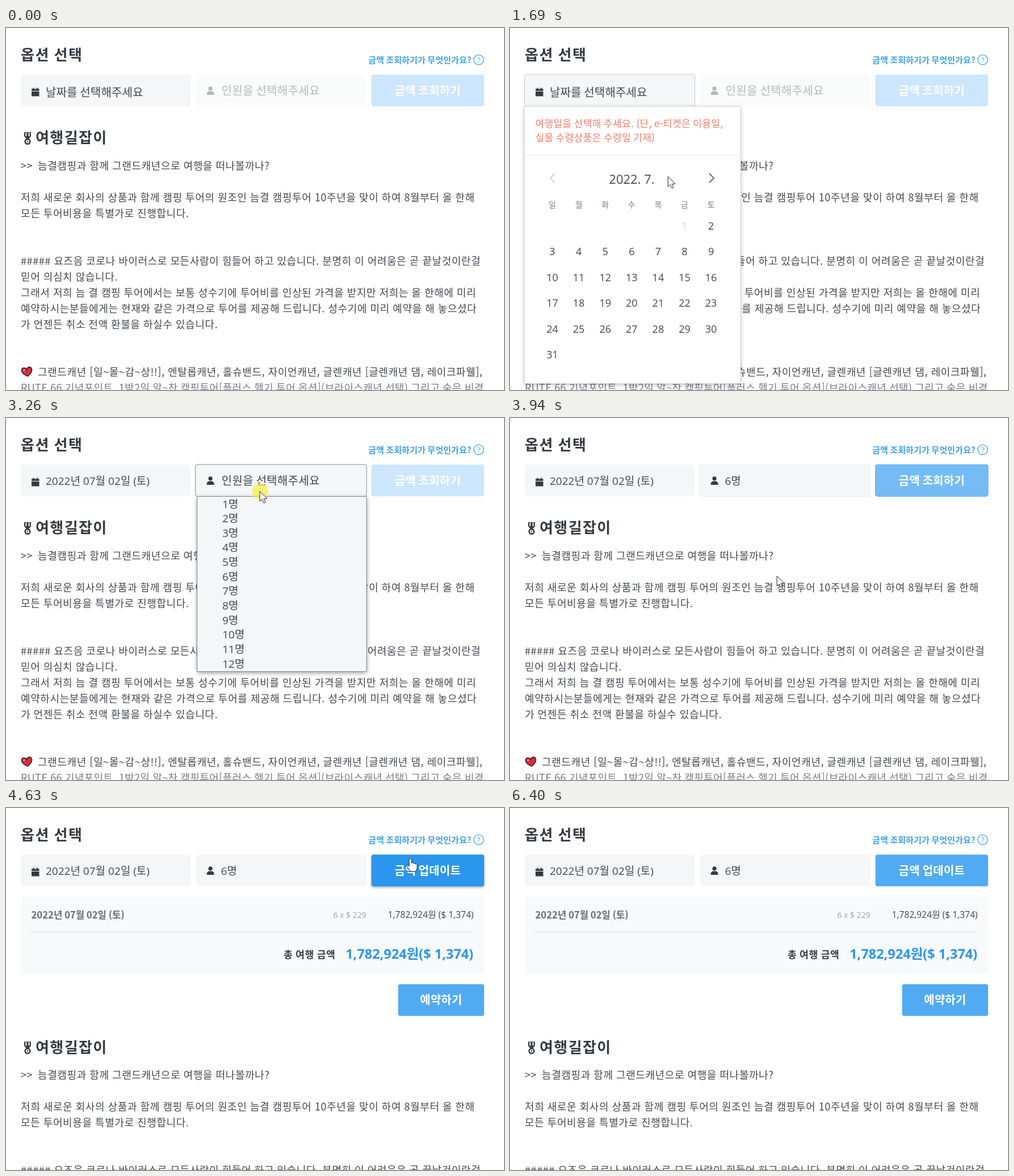
An HTML page with a canvas for the animation above (6.94 s loop, 877 px wide and 639 px high).

```html
<!DOCTYPE html>
<html lang="ko">
<head>
<meta charset="utf-8">
<title>옵션 선택</title>
<style>
html, body { margin: 0; width: 100%; height: 100%; overflow: hidden; background: #fff; }
canvas { display: block; width: 877px; height: 639px; }
</style>
</head>
<body>
<canvas id="stage"></canvas>
<script>
const W = 877, H = 639, LOOP = 6940;
const canvas = document.getElementById('stage');
const ctx = canvas.getContext('2d');
const dpr = window.devicePixelRatio || 1;
canvas.width = W * dpr;
canvas.height = H * dpr;

const KR = '"Noto Sans CJK KR", "Noto Sans CJK", sans-serif';
const MIX = '"Open Sans", ' + KR;
const INK = '#343a40', SOFT = '#42484e', FIELD = '#f4f6f8', BLUE = '#51abf3', DEEP = '#2b96ed';

const OPEN_CAL = 1280, PICK_DATE = 2240, OPEN_LIST = 3190, PICK_COUNT = 3870, SHOW_PRICE = 4560;

// time, x, y, 1 = linear arrival
const path = [
  [320, 717, 491], [950, 207.5, 117], [1280, 207.5, 117], [1410, 216, 150, 1],
  [1690, 278, 262, 1], [1900, 334, 344, 1], [1970, 341, 351, 1], [2640, 341, 351],
  [3190, 447, 129.5], [3330, 447, 129.5], [3460, 455, 158], [3600, 470, 279],
  [4010, 470, 279], [4490, 712, 89], [5100, 712, 89], [5720, 774, 340],
  [6120, 774, 340], [6400, 838, 642]
];
const clicks = [[1080, 1280], [2040, 2240], [3190, 3460], [3800, 3870]];

const body = [
  [56, 243, '늠결캠핑과 함께 그랜드캐년으로 여행을 떠나볼까나?'],
  [26, 299, '저희 새로운 회사의 상품과 함께 캠핑 투어의 원조인 늠결 캠핑투어 10주년을 맞이 하여 8월부터 올 한해'],
  [26, 327, '모든 투어비용을 특별가로 진행합니다.'],
  [26, 411, '##### 요즈음 코로나 바이러스로 모든사람이 힘들어 하고 있습니다. 분명히 이 어려움은 곧 끝날것이란걸'],
  [26, 439, '믿어 의심치 않습니다.'],
  [26, 467, '그래서 저희 늠 결 캠핑 투어에서는 보통 성수기에 투어비를 인상된 가격을 받지만 저희는 올 한해에 미리'],
  [26, 495, '예약하시는분들에게는 현재와 같은 가격으로 투어를 제공해 드립니다. 성수기에 미리 예약을 해 놓으셨다'],
  [26, 523, '가 언젠든 취소 전액 환불을 하실수 있습니다.'],
  [56, 607, '그랜드캐년 [일~몰~감~상!!], 엔탈롭캐년, 홀슈밴드, 자이언캐년, 글렌캐년 [글렌캐년 댐, 레이크파웰],']
];

const between = (t, a, b) => t >= a && t < b;
const clamp = v => Math.max(0, Math.min(1, v));
const smooth = u => u * u * (3 - 2 * u);

// y is the optical middle of the line
function text(s, x, y, size, o = {}) {
  ctx.font = `${o.weight || 400} ${size}px ${o.font || KR}`;
  ctx.letterSpacing = (o.gap || 0) + 'px';
  ctx.wordSpacing = (o.word || 0) + 'px';
  ctx.textAlign = o.align || 'left';
  ctx.fillStyle = o.color || SOFT;
  ctx.fillText(s, x, y + size * 0.37);
}

function box(x, y, w, h, r, fill, stroke) {
  ctx.beginPath();
  ctx.roundRect(x, y, w, h, r);
  if (fill) { ctx.fillStyle = fill; ctx.fill(); }
  ctx.shadowColor = 'transparent';
  if (stroke) { ctx.strokeStyle = stroke; ctx.lineWidth = 1; ctx.stroke(); }
}

function shadow(color, blur, dy) {
  ctx.shadowColor = color;
  ctx.shadowBlur = blur * dpr;
  ctx.shadowOffsetY = dy * dpr;
}

function line(points, color, width) {
  ctx.beginPath();
  points.forEach(p => ctx.lineTo(...p));
  ctx.strokeStyle = color;
  ctx.lineWidth = width;
  ctx.stroke();
}

function dot(x, y, r, fill) {
  ctx.beginPath();
  ctx.arc(x, y, r, 0, 7);
  ctx.fillStyle = fill;
  ctx.fill();
}

function mix(a, b, u) {
  return `rgb(${a.map((v, i) => Math.round(v + (b[i] - v) * u))})`;
}

function cursorAt(t) {
  if (t < path[0][0] || t >= path[path.length - 1][0]) return null;
  const i = path.findIndex(k => k[0] > t);
  const a = path[i - 1], b = path[i];
  let u = (t - a[0]) / (b[0] - a[0]);
  if (!b[3]) u = smooth(u);
  return { x: a[1] + (b[1] - a[1]) * u, y: a[2] + (b[2] - a[2]) * u };
}

const inside = (p, x, y, w, h) => p && p.x >= x && p.x <= x + w && p.y >= y && p.y <= y + h;

function button(label, x, y, w, h, fill, hover, stroke) {
  if (hover) shadow('rgba(0,0,0,.35)', 4, 2);
  box(x, y, w, h, 4, fill, stroke);
  text(label, x + w / 2, y + h / 2, 20, { weight: 700, color: '#fff', align: 'center', gap: 0.2 });
}

function header() {
  text('옵션 선택', 26, 47, 26, { weight: 700, gap: 1.6, color: INK });
  text('금액 조회하기가 무엇인가요?', 638, 56, 15, { weight: 700, color: '#3ba1ef', gap: 0.1 });
  ctx.beginPath();
  ctx.arc(832.5, 56, 8.7, 0, 7);
  ctx.strokeStyle = '#3ba1ef';
  ctx.lineWidth = 1.3;
  ctx.stroke();
  text('?', 832.5, 56, 13, { font: MIX, color: '#3ba1ef', align: 'center' });
}

function dateField(t) {
  const focus = between(t, 880, 1970);
  if (focus) box(25.5, 82, 300, 56.5, 4, FIELD, '#c6cacf');
  else box(26, 82.5, 299, 55.5, 4, FIELD);
  ctx.fillStyle = INK;
  ctx.fillRect(47.5, 105.5, 2, 4);
  ctx.fillRect(54, 105.5, 2, 4);
  ctx.fillRect(45, 107.5, 13.5, 3.5);
  ctx.fillRect(45, 112, 13.5, 8.5);
  if (t < PICK_DATE) text('날짜를 선택해주세요', 70, 113.5, 20, { gap: 0.15 });
  else text('2022년 07월 02일 (토)', 70, 111, 19, { font: MIX });
}

function countField(t) {
  const on = t >= PICK_DATE;
  const color = on ? INK : '#b4b8bc';
  if (between(t, OPEN_LIST, PICK_COUNT)) box(333.5, 82, 301.5, 56.5, 4, FIELD, '#85898d');
  else if (between(t, PICK_COUNT, 4010)) box(333.5, 82, 301.5, 56.5, 4, FIELD, '#e9edf0');
  else box(334.5, 82.5, 300, 55.5, 4, on ? FIELD : '#fafbfb');
  dot(360, 106.8, 3.6, color);
  box(353.5, 111.5, 13, 6.5, [5, 5, 1, 1], color);
  if (t < PICK_COUNT) text('인원을 선택해주세요', 379.5, 111, 20, { color: on ? SOFT : color, gap: 0.3 });
  else text('6명', 378.5, 111, 19, { font: MIX });
}

function priceButton(t, p) {
  const u = clamp((t - 3862) / 112);
  const hover = t > 4100 && inside(p, 644, 82.5, 198, 55.5);
  const fill = hover ? DEEP : mix([204, 230, 253], [81, 171, 243], u);
  const edge = u > 0 && u < 1 ? BLUE : null;
  button(t < SHOW_PRICE ? '금액 조회하기' : '금액 업데이트', 643.5, 82.3, 198.5, 56, fill, hover, edge);
}

function medal(x, y) {
  ctx.fillStyle = INK;
  ctx.beginPath();
  [[-6, -10], [6, -10], [6, -3], [2, 2], [-2, 2], [-6, -3]].forEach(q => ctx.lineTo(x + q[0], y + q[1]));
  ctx.fill();
  ctx.fillStyle = '#fff';
  ctx.fillRect(x - 3.6, y - 9, 2, 6);
  ctx.fillRect(x + 1.6, y - 9, 2, 6);
  dot(x, y + 6.5, 5.6, INK);
  dot(x, y + 6.5, 3, '#fff');
  dot(x, y + 6.5, 1.2, INK);
}

function heart(x, y) {
  ctx.save();
  ctx.translate(x, y);
  ctx.rotate(-0.15);
  ctx.beginPath();
  ctx.moveTo(0, 8);
  ctx.bezierCurveTo(-6, 4, -10, 0, -9, -4);
  ctx.bezierCurveTo(-8, -9, -2, -9, 0, -4);
  ctx.bezierCurveTo(2, -9, 8, -9, 9, -4);
  ctx.bezierCurveTo(10, 0, 6, 4, 0, 8);
  ctx.fillStyle = '#d92f3c';
  ctx.fill();
  ctx.strokeStyle = '#3a1218';
  ctx.lineWidth = 1.5;
  ctx.stroke();
  ctx.restore();
  dot(x - 5, y - 3, 1.5, '#f7a5ab');
}

function article(shift) {
  ctx.save();
  ctx.translate(0, shift);
  medal(38, 194);
  text('여행길잡이', 52, 193.5, 26, { weight: 700, gap: 1.4, color: INK });
  const style = { gap: 0.6, word: 0.8 };
  text('>>', 26, 243, 18, style);
  body.forEach(([x, y, s]) => text(s, x, y, 18, style));
  heart(37, 607);
  text('RUTE 66 기념포인트, 1박2일 알~찬 캠핑투어[플러스 헬기 투어 옵션](브라이스캐년 선택) 그리고 숨은 비경',
    26, 635, 18, { gap: 0.35, word: 0.6, color: '#777b80' });
  ctx.restore();
}

function priceCard(p) {
  box(26, 157, 816, 135.5, 2, '#f8f9fb');
  text('2022년 07월 02일 (토)', 44.5, 188.5, 16.7, { weight: 700, color: '#666d75' });
  text('6 x $ 229', 634.5, 189, 14, { font: MIX, color: '#9ea3a8', align: 'right' });
  text('1,782,924원 ($ 1,374)', 823.5, 188.5, 15.7, { font: MIX, align: 'right' });
  line([[44, 219.5], [824, 219.5]], '#dfe3e7', 1);
  text('총 여행 금액', 489, 259, 17, { weight: 700, gap: 0.8, color: INK });
  text('1,782,924원($ 1,374)', 823, 257.5, 23.5, { font: MIX, weight: 700, color: DEEP, align: 'right' });
  const hover = inside(p, 690, 311, 152, 56);
  button('예약하기', 690.5, 311, 151.5, 56, hover ? DEEP : BLUE, hover);
}

function calendar() {
  shadow('rgba(0,0,0,.3)', 7, 2);
  box(25.5, 138.5, 380.5, 489, [0, 0, 2, 2], '#fff', '#d9dcdf');
  const coral = { color: '#fa7a68', gap: 0.38 };
  text('여행일을 선택해 주세요. (단, e-티켓은 이용일,', 44.5, 169, 17, coral);
  text('실물 수령상품은 수령일 기재)', 44.5, 194, 17, coral);
  line([[26, 224.5], [406, 224.5]], '#e3e6e9', 1);
  line([[79, 257], [71, 265], [79, 273]], '#ced2d6', 2);
  line([[351, 257], [359, 265], [351, 273]], '#666c72', 2);
  text('2022. 7.', 214.5, 267, 22, { font: MIX, align: 'center' });
  const colX = i => 74.5 + 46.6 * i;
  [...'일월화수목금토'].forEach((d, i) => text(d, colX(i), 311.5, 14, { color: '#757b81', align: 'center' }));
  for (let d = 1; d <= 31; d++) {
    const cell = d + 4;
    text(String(d), colX(cell % 7), 349 + 45.5 * Math.floor(cell / 7), 18,
      { font: MIX, align: 'center', color: d === 1 ? '#d3d6d9' : SOFT });
  }
}

function countList(t, p) {
  const pitch = 25.65, top = 138.5;
  shadow('rgba(0,0,0,.4)', 8, 2);
  box(336.5, top, 298.5, 309, 0, FIELD, '#85898d');
  const hot = t >= 3530 && p ? Math.floor((p.y - top) / pitch) : -1;
  for (let i = 0; i < 12; i++) {
    if (i === hot) {
      ctx.fillStyle = '#1967d2';
      ctx.fillRect(337, top + i * pitch, 297.5, pitch);
    }
    text(i + 1 + '명', 381, 151.5 + i * pitch, 19, { font: MIX, color: i === hot ? '#fff' : SOFT });
  }
}

function arrow() {
  ctx.beginPath();
  [[0, 0], [0, 17.5], [4, 14], [7, 20.5], [9.8, 19.3], [7, 13], [13, 12.6]].forEach(q => ctx.lineTo(...q));
  ctx.closePath();
}

function hand() {
  ctx.beginPath();
  ctx.moveTo(-2, 14);
  ctx.lineTo(-2, 1.5);
  ctx.quadraticCurveTo(0, -1.5, 2, 1.5);
  ctx.lineTo(2, 8);
  ctx.quadraticCurveTo(4, 6, 5.5, 9);
  ctx.quadraticCurveTo(8, 7, 9, 10);
  ctx.quadraticCurveTo(12, 8.5, 12, 12);
  ctx.lineTo(12, 16);
  ctx.quadraticCurveTo(12, 19, 9.5, 23);
  ctx.lineTo(0, 23);
  ctx.quadraticCurveTo(-2, 19, -6.5, 13.5);
  ctx.quadraticCurveTo(-6, 10, -2, 14);
  ctx.closePath();
}

function cursor(t, p) {
  if (clicks.some(c => between(t, ...c))) dot(p.x + 0.5, p.y + 0.5, 14, 'rgba(250,240,40,.65)');
  const overField = t < OPEN_CAL && inside(p, 26, 82, 299, 56);
  const overPrice = t > 4100 && inside(p, 644, 82, 198, 56);
  const overBook = t >= SHOW_PRICE && inside(p, 690, 311, 152, 56);
  ctx.save();
  ctx.translate(p.x, p.y);
  if (overField || overPrice || overBook) hand();
  else arrow();
  ctx.fillStyle = '#fff';
  ctx.fill();
  ctx.strokeStyle = '#222';
  ctx.lineWidth = 1;
  ctx.lineJoin = 'round';
  ctx.stroke();
  ctx.restore();
}

function draw(t) {
  ctx.setTransform(dpr, 0, 0, dpr, 0, 0);
  ctx.fillStyle = '#fff';
  ctx.fillRect(0, 0, W, H);
  const p = cursorAt(t), priced = t >= SHOW_PRICE;
  header();
  article(priced ? 228.5 : 0);
  dateField(t);
  countField(t);
  priceButton(t, p);
  if (priced) priceCard(p);
  if (between(t, OPEN_CAL, PICK_DATE)) calendar();
  if (between(t, OPEN_LIST, PICK_COUNT)) countList(t, p);
  if (p) cursor(t, p);
}

const start = performance.now();
function tick() {
  draw((performance.now() - start) % LOOP);
  requestAnimationFrame(tick);
}
tick();
</script>
</body>
</html>
```
